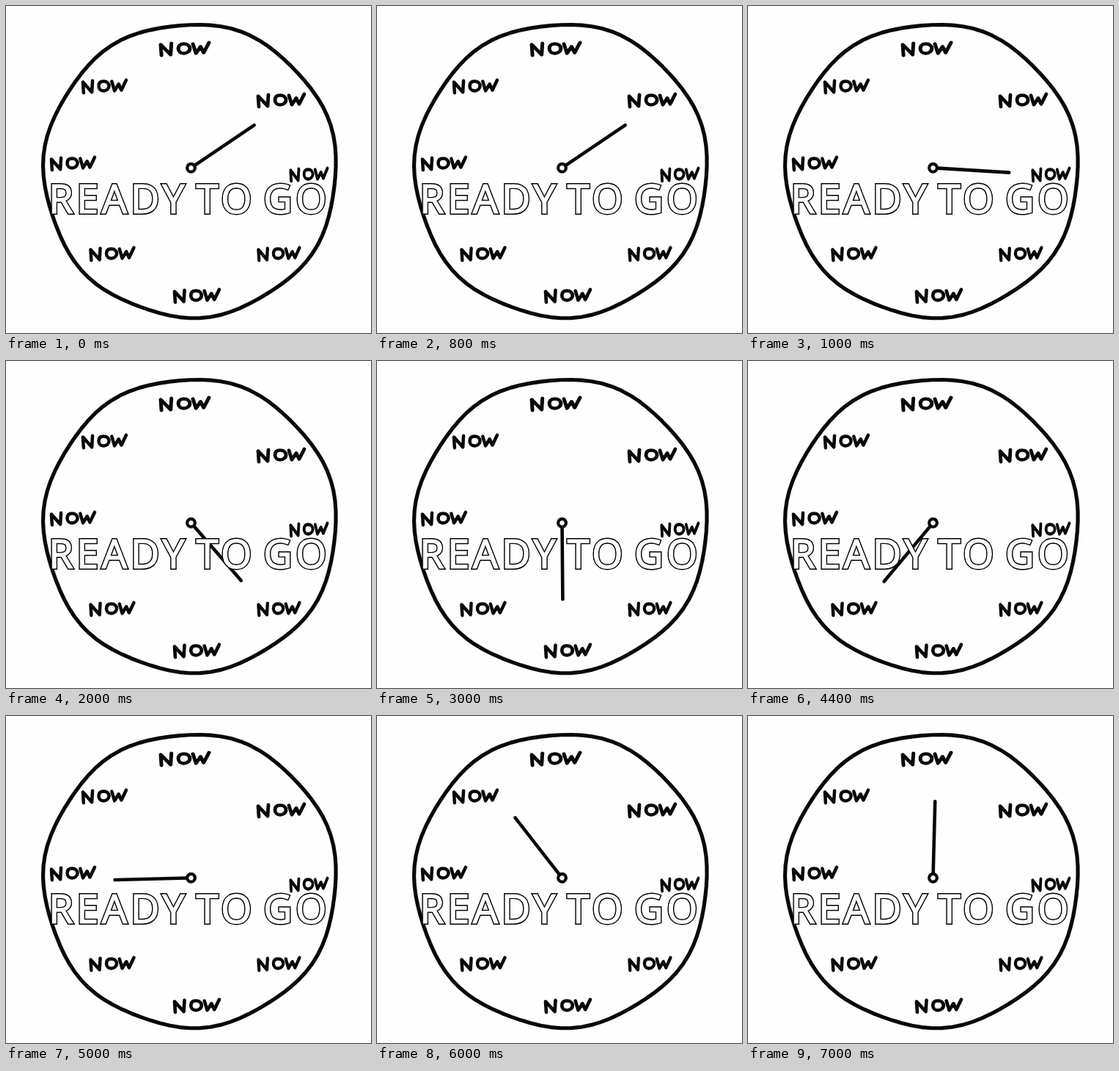
An HTML page for the animation above (8000 ms loop, 498x445 px).

```html
<!DOCTYPE html>
<html lang="en">
<head>
<meta charset="utf-8">
<title>Ready to go</title>
<style>
  html, body { margin: 0; width: 100%; height: 100%; overflow: hidden; background: #fdfefd; }
  svg { display: block; width: 498px; height: 445px; }
  .ink { fill: none; stroke: #080808; stroke-linecap: round; stroke-linejoin: round; }
  text {
    font: 54.5px "Noto Sans", "Open Sans", sans-serif;
    letter-spacing: 4.2px; word-spacing: -7px;
    fill: #fff; stroke: #fff; stroke-width: 1px;
  }
  /* A wider dark copy behind the white text leaves a thin outline around bolder letters */
  .outline { stroke: #000; stroke-width: 3.8px; }
</style>
</head>
<body>
<svg viewBox="0 0 498 445">
  <path id="rim" class="ink" stroke-width="5.2"/>
  <g id="labels" class="ink" stroke-width="4.8"></g>
  <g class="ink" transform="translate(252.5 220.3)">
    <path id="hand" d="M0 -6V-104" stroke-width="4.6"/>
    <circle r="5.4" stroke-width="4.2"/>
  </g>
  <text class="outline" x="58" y="282" aria-hidden="true">READY TO GO</text>
  <text x="58" y="282">READY TO GO</text>
</svg>
<script>
const el = id => document.getElementById(id);
const STEP = 1000;
const HAND_ANGLES = [56, 93.5, 139, 179.5, 220, 268.5, 322, 1.5];

// A circle with a slight wobble; angles run clockwise from the top
function rimPath(cx, cy) {
  const points = [];
  for (let degrees = 0; degrees < 360; degrees += 4) {
    const a = degrees * Math.PI / 180;
    const lean = a - Math.PI / 9;
    const r = 199.5 + 1.2 * Math.cos(lean) + 1.8 * Math.cos(7 * lean);
    points.push(`${cx + r * Math.sin(a)} ${cy - r * Math.cos(a)}`);
  }
  return `M${points.join("L")}Z`;
}
el("rim").setAttribute("d", rimPath(251, 225));

// Hand-lettered word, 64 units wide around its own centre
const WORD = "M-30 10L-31 -6L-18 9L-17 -8" +
  "M-1 -7C-6 -7 -8 -4 -8 0S-5 7 -1 7S7 4 7 0S4 -7 -1 -7Z" +
  "M11 -7L15 7L21 -3L25 6L32 -9";

// Centre and width of each word
const labels = [
  [243.5, 58, 67], [375, 128, 64], [413, 229, 51], [372, 337, 57],
  [260, 394, 62], [144.5, 337, 60], [91, 214, 60], [134, 109, 60]
];
el("labels").innerHTML = labels.map(([x, y, width]) =>
  `<path d="${WORD}" transform="translate(${x} ${y}) scale(${width / 64} 0.92)"/>`
).join("");

function draw(time) {
  const second = Math.floor(time / STEP) % HAND_ANGLES.length;
  el("hand").setAttribute("transform", `rotate(${HAND_ANGLES[second]})`);
}

const start = performance.now();
function tick() {
  draw(performance.now() - start);
  requestAnimationFrame(tick);
}
tick();
</script>
</body>
</html>
```
